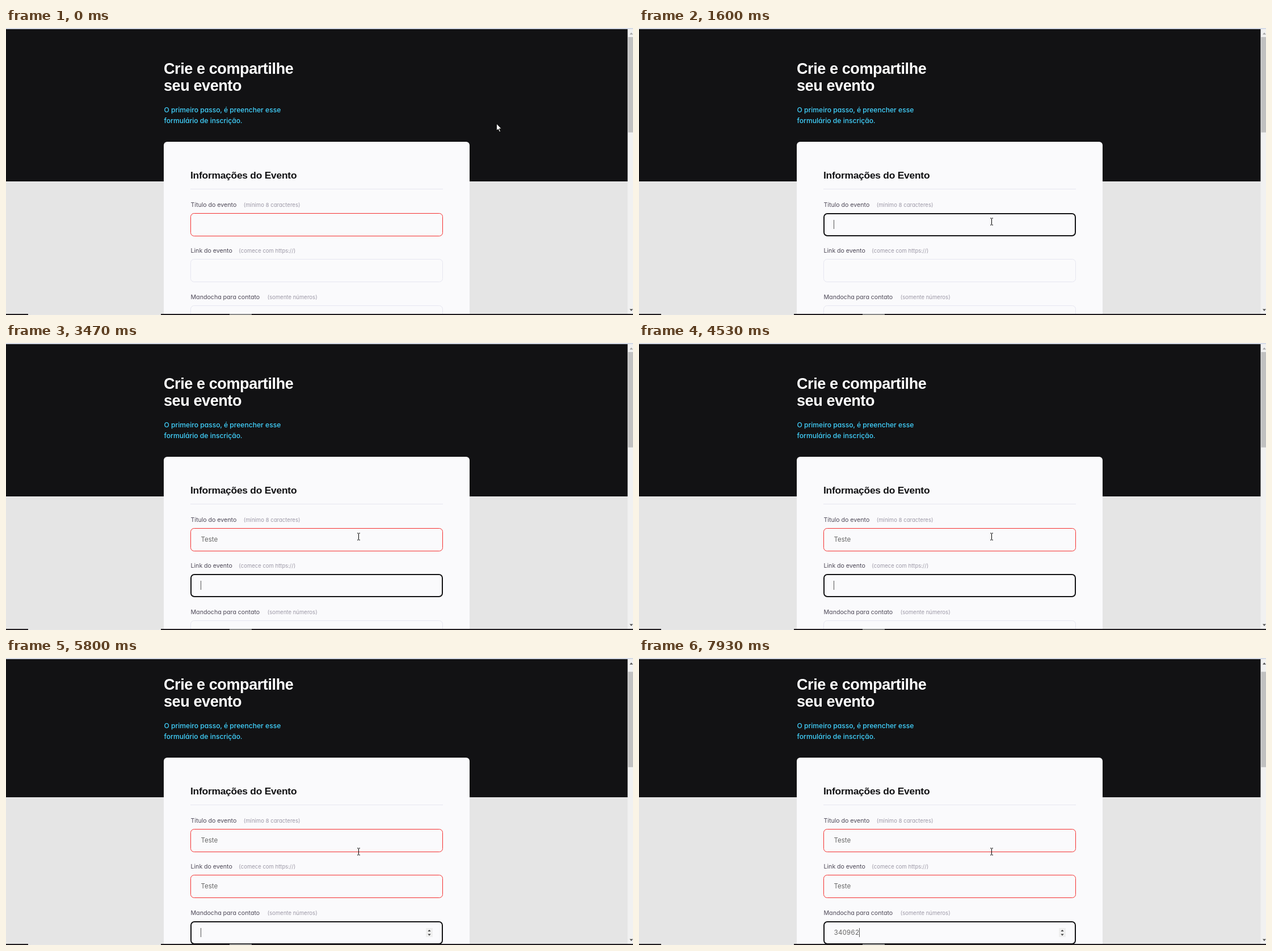
Recreate the animation shown at these times as an HTML page. Size 1105x507 px, loop 8 s.

```html
<!DOCTYPE html>
<html lang="pt-BR">
<head>
<meta charset="utf-8">
<title>Crie e compartilhe seu evento</title>
<style>
  html, body { margin: 0; height: 100%; overflow: hidden; }
  svg { display: block; width: 1105px; height: 507px; }
  text { font-family: Inter, sans-serif; font-feature-settings: "cv11", "tnum"; white-space: pre; }
  .title { font: bold 27px "Liberation Sans", Arial, sans-serif; letter-spacing: -.4px; fill: #fff; }
  .lead { font-size: 12.1px; font-weight: 500; fill: #42d3ff; }
  .legend { font: bold 17.4px "Liberation Sans", Arial, sans-serif; letter-spacing: -.24px; fill: #121214; }
  .label { font-size: 10.65px; fill: #4e4958; }
  .hint { font-size: 9.55px; fill: #9c98a6; }
  .value { font-size: 11.5px; fill: #666; }
</style>
</head>
<body>
<svg viewBox="0 0 1105 507">
  <defs><clipPath id="view"><rect y="2" width="1096" height="503"/></clipPath></defs>
  <rect width="1105" height="507" fill="#e5e5e5"/>
  <g clip-path="url(#view)">
    <g id="page">
      <rect width="1096" height="271" fill="#121214"/>
      <text class="title" x="278" y="81">Crie e compartilhe</text>
      <text class="title" x="278" y="111">seu evento</text>
      <text class="lead" x="278.5" y="149">O primeiro passo, é preencher esse</text>
      <text class="lead" x="278.5" y="167.7">formulário de inscrição.</text>
      <rect x="278" y="201" width="539" height="400" rx="6" fill="#fafafc"/>
      <text class="legend" x="325" y="266">Informações do Evento</text>
      <rect x="325" y="284" width="445" height="1" fill="#e6e6f0"/>
      <g id="fields"></g>
      <g id="spinner">
        <rect x="740" y="502" width="12" height="16" fill="#efefef"/>
        <path d="M743.3 508l2.7-3 2.7 3zM743.3 512.5l2.7 3 2.7-3z" fill="#404040"/>
      </g>
      <rect id="caret" x="343" width="1" height="16" fill="#555"/>
    </g>
  </g>
  <rect x="1095.5" y="2" width="9.5" height="503" fill="#f1f1f1"/>
  <rect id="thumb" x="1096.5" y="16" width="8.5" height="168.5" fill="#c1c1c1"/>
  <path id="up" d="M1099 11.5l3-3.5 3 3.5z"/>
  <path d="M1099 496.5l3 3.5 3-3.5z" fill="#505050"/>
  <rect width="1105" height="2" fill="#d5dae6"/>
  <rect y="505" width="1105" height="2" fill="#1f1b1f"/>
  <rect x="39" y="505" width="234" height="2" fill="#e6e6e6"/>
  <rect x="394" y="505" width="39" height="2" fill="#888"/>
  <path id="arrow" d="M0 0v12.4l2.9-2.7 2.2 4.9 2-.9-2.2-4.7h4z" fill="#fff" stroke="#000" stroke-width=".9"/>
  <path id="beam" d="M-2.5-6h2m1 0h2M0-5.5v11M-2.5 6h2m1 0h2" fill="none" stroke="#000"/>
</svg>
<script>
const LOOP = 8000, SCROLL = 25;
const $ = id => document.getElementById(id);
const show = (el, on) => el.setAttribute("visibility", on ? "visible" : "hidden");
const move = (el, x, y) => el.setAttribute("transform", `translate(${x} ${y})`);
const countPast = (times, t) => times.filter(at => at <= t).length;

const fields = [
  { y: 327, label: "Título do evento", hint: "(mínimo 8 caracteres)", hintX: 418.5, text: "Teste", keys: [2530] },
  { y: 408, label: "Link do evento", hint: "(comece com https://)", hintX: 410, text: "Teste", keys: [4730] },
  { y: 490, label: "Mandocha para contato", hint: "(somente números)", hintX: 460.5, text: "340962",
    keys: [7470, 7670, 7735, 7800, 7870, 7930] }
];
const focusTimes = [1600, 3470, 5800];
const caretFlips = [1600, 2070, 2530, 3070, 3470, 4000, 4530, 5270, 5800, 6270, 6800, 7330, 7470];

$("fields").innerHTML = fields.map(f => `
  <text class="label" x="325.5" y="${f.y - 11.3}">${f.label}</text>
  <text class="hint" x="${f.hintX}" y="${f.y - 11.3}">${f.hint}</text>
  <rect class="box" fill="#fafafc"/>
  <text class="value" x="343.5" y="${f.y + 23.7}"></text>`).join("");
const boxes = document.querySelectorAll(".box");
const values = document.querySelectorAll(".value");

function drawField(f, i, focus, t) {
  const width = i === focus ? 2 : 1;
  const color = i === focus ? "#121214" : i < focus || i === 0 ? "#f42e2e" : "#e6e6f0";
  const box = { x: 325 + width / 2, y: f.y + width / 2, width: 445 - width, height: 41 - width,
    rx: 6, stroke: color, "stroke-width": width };
  for (const key in box) boxes[i].setAttribute(key, box[key]);
  const typed = countPast(f.keys, t);
  values[i].textContent = f.text.slice(0, f.keys.length === 1 ? typed * f.text.length : typed);
}

function drawPointer(t) {
  const step = Math.max(0, Math.min(10, Math.floor((t - 590) * .015) + 1));
  const left = 1 - step / 10;
  const x = 621.5 + 243 * left ** 2;
  const y = 342 - 173 * left ** 1.7;
  const overField = y > 327;
  show($("arrow"), !overField);
  show($("beam"), overField);
  move($(overField ? "beam" : "arrow"), x, y);
}

function draw() {
  const t = performance.now() % LOOP;
  const focus = countPast(focusTimes, t) - 1;
  const scroll = focus === 2 ? SCROLL : 0;
  move($("page"), 0, -scroll);
  move($("thumb"), 0, scroll / 3);
  $("up").setAttribute("fill", scroll ? "#505050" : "#a3a3a3");
  fields.forEach((f, i) => drawField(f, i, focus, t));
  show($("spinner"), focus === 2);
  show($("caret"), countPast(caretFlips, t) % 2 === 1);
  if (focus >= 0) {
    $("caret").setAttribute("x", Math.round(343 + values[focus].getComputedTextLength()));
    $("caret").setAttribute("y", fields[focus].y + 12);
  }
  drawPointer(t);
  requestAnimationFrame(draw);
}
draw();
</script>
</body>
</html>
```
